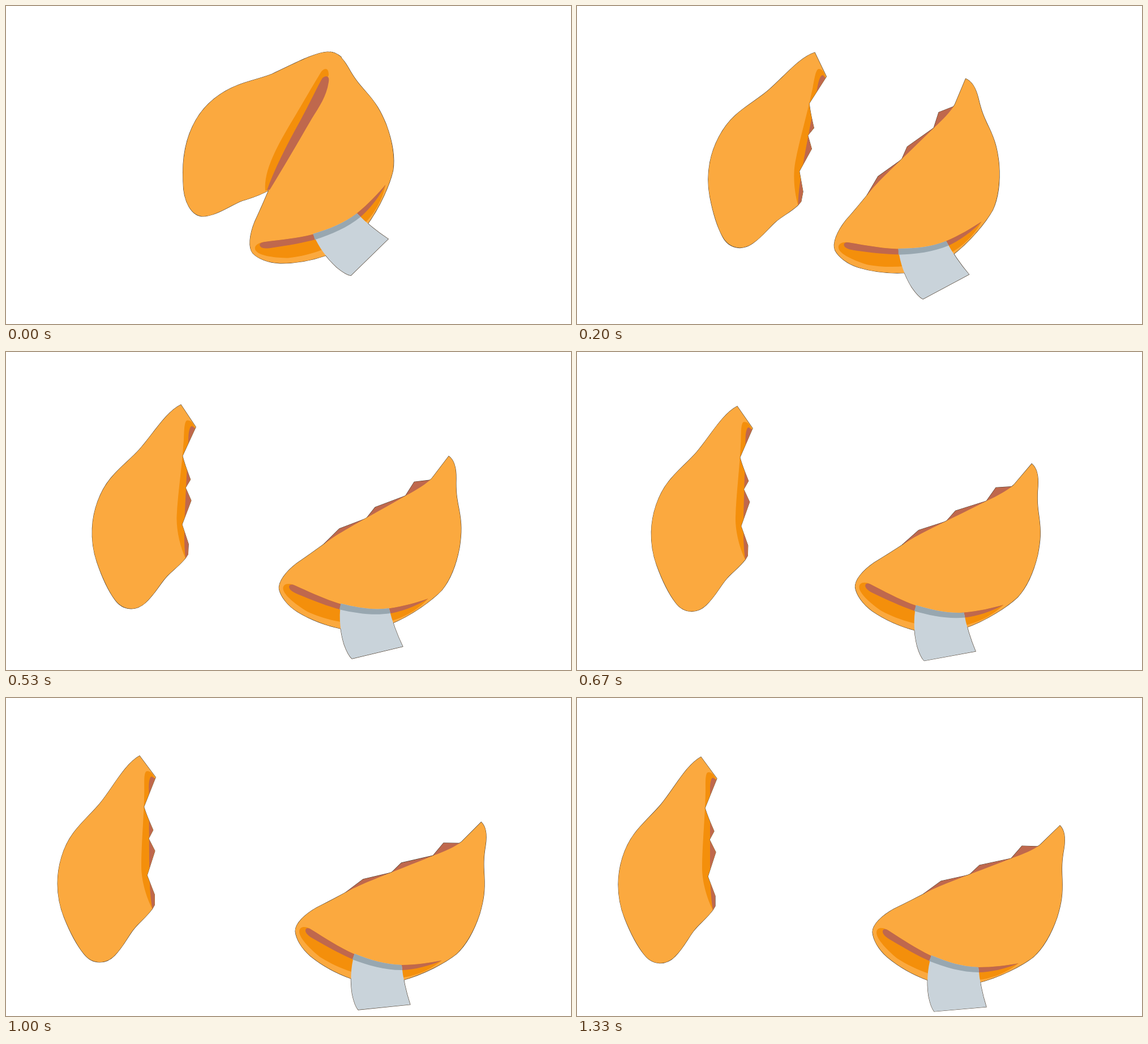
Recreate the animation shown at these times as an HTML page with a canvas. Size 998 by 561 pixels, loop 2200 ms.

```html
<!DOCTYPE html>
<html lang="en">
<head>
<meta charset="utf-8">
<title>Fortune cookie</title>
<style>
  html, body { margin: 0; width: 100%; height: 100%; overflow: hidden; background: #fff; }
  canvas { display: block; }
</style>
</head>
<body>
<canvas id="stage" width="998" height="561"></canvas>
<script>
const ctx = document.getElementById('stage').getContext('2d');
const LOOP = 2200, STEPS_PER_MS = 0.015, LAST_STEP = 20;
const DOUGH = '#fba93f', INSIDE = '#f48f0b', CRACK = '#bf684d', PAPER = '#c9d3da', SHADE = '#98a7b0';

const shape = (color, d, edged = false) => ({ color, path: new Path2D(d), edged });

// Both halves are drawn in their resting place.
const leftBody = shape(DOUGH, `M219 104L247 142L226 194Q230 208 242 235L234 250L245 272L231 315L244 349V367L240 374
  C228 390 216 398 206 411C196 424 188 441 173 456C157 472 134 472 119 453C106 437 93 411 84 388
  C75 365 73 345 73 329C73 298 83 264 101 240C115 221 134 205 149 187C172 159 193 118 219 104Z`, true);
const leftInside = [
  shape(INSIDE, 'M240 374C230 355 221 325 221 300C221 260 226 215 227 165C227 150 226 131 232 131C240 131 243 138 246 144H260V374Z'),
  shape(CRACK, 'M240 374C236 350 235 325 235 290V160C235 146 238 139 241 141L247 145H260V374Z')
];
leftInside.forEach(s => s.clip = leftBody.path);
const left = [leftBody, ...leftInside];

const chips = shape(CRACK, 'M613 345L643 323L693 312L711 295L767 283L786 261L816 262L790 290L640 345Z', true);
const right = [
  shape(DOUGH, `M853 225C862 234 863 248 860 266C856 288 856 300 857 320C858 345 856 361 848 387
    C840 410 826 439 806 457C788 471 748 493 706 503L620 498C590 487 566 472 548 457
    C532 443 523 426 522 413C522 400 538 384 560 372C583 361 608 348 625 339
    C650 327 690 313 767 283C789 275 806 268 818 259Z`, true),
  shape(INSIDE, `M780 468C755 488 725 497 700 498C650 500 600 482 565 459C548 445 529 425 529 414
    C529 404 540 404 548 409C600 442 645 474 710 475C735 475 758 472 780 468Z`),
  shape(CRACK, `M780 468C760 477 730 484 709 484C650 484 600 454 556 428C545 422 539 416 540 411
    C541 407 545 407 550 410C600 442 645 474 710 475C735 475 758 472 780 468Z`),
  shape(PAPER, 'M626 454C618 480 618 505 621 526Q625 546 631 553L723 545Q712 510 709 475C680 474 655 466 626 454Z', true),
  shape(SHADE, 'M626 454C655 466 680 474 709 475L710 484C680 484 650 475 622 464Z')
];

// Parts seen only while the cookie is whole.
const wholeBody = shape(DOUGH, `M466 324C445 336 428 340 416 344C396 352 370 371 348 371C328 371 313 345 313 310
  C311 275 316 235 335 202C352 172 380 151 410 139.5C430 131.5 450 128 470 120
  C505 104 545 82 568 81Q582 81 592 90L600 130L500 300Z`, true);
const fold = [
  shape(INSIDE, 'M458 326C455 290 478 248 510 195C528 165 545 135 555 119C560 110 570 106 570 122L540 180L466 323Z'),
  shape(CRACK, `M461 325C474 288 496 245 521 200C541 163 551 140 559 127C566 121 572 124 570 134
    C566 160 553 178 540 199C515 242 490 285 466 324Z`)
];

// Pivot position and rotation (degrees) at each key step.
const keySteps = [0, 3, 6, 8, 12, 15, 20];
const leftMove = {
  x: [564, 420, 342, 309, 262, 236, 219],
  y: [82, 82, 90, 93, 98.5, 102, 104],
  angle: [28, 10.7, 4.7, 2.75, 0.6, -0.3, 0]
};
const rightMove = {
  x: [609, 611, 609, 611, 616, 622, 631],
  y: [475.5, 517, 535, 541, 547, 550, 553],
  angle: [-39.3, -23.1, -12.5, -8.5, -3.1, -0.8, 0]
};

// Slope at key i of the parabola through it and its neighbours.
function slope(values, i) {
  const mid = Math.min(Math.max(i, 1), keySteps.length - 2);
  const h0 = keySteps[mid] - keySteps[mid - 1], h1 = keySteps[mid + 1] - keySteps[mid];
  const d0 = (values[mid] - values[mid - 1]) / h0, d1 = (values[mid + 1] - values[mid]) / h1;
  const bend = (d1 - d0) / (h0 + h1);
  return d0 + bend * h0 + 2 * bend * (keySteps[i] - keySteps[mid]);
}

function valueAt(values, step) {
  let i = 0;
  while (i < keySteps.length - 2 && step >= keySteps[i + 1]) i++;
  const h = keySteps[i + 1] - keySteps[i], u = (step - keySteps[i]) / h, v = 1 - u;
  return v * v * (1 + 2 * u) * values[i] + u * u * (1 + 2 * v) * values[i + 1]
    + h * u * v * (v * slope(values, i) - u * slope(values, i + 1));
}

function pose(move, step) {
  return new DOMMatrix()
    .translate(valueAt(move.x, step), valueAt(move.y, step))
    .rotate(valueAt(move.angle, step))
    .translate(-move.x.at(-1), -move.y.at(-1));
}

// Edges go below all fills, so only the silhouette keeps its dark line.
function paint(groups) {
  for (const [matrix, shapes] of groups) {
    ctx.setTransform(matrix);
    shapes.filter(s => s.edged).forEach(s => ctx.stroke(s.path));
  }
  for (const [matrix, shapes] of groups) {
    ctx.setTransform(matrix);
    for (const s of shapes) {
      ctx.save();
      if (s.clip) ctx.clip(s.clip);
      ctx.fillStyle = s.color;
      ctx.fill(s.path);
      ctx.restore();
    }
  }
}

function draw(now) {
  const step = Math.min(LAST_STEP, Math.floor((now % LOOP + 4) * STEPS_PER_MS));
  const still = new DOMMatrix(), rightPose = pose(rightMove, step);
  ctx.resetTransform();
  ctx.clearRect(0, 0, 998, 561);
  ctx.strokeStyle = '#4a3a2a';
  ctx.lineWidth = 1.2;
  paint(step === 0
    ? [[still, [wholeBody]], [rightPose, right], [still, fold]]
    : [[pose(leftMove, step), left], [rightPose, [chips, ...right]]]);
}

const start = performance.now();
function tick() {
  draw(performance.now() - start);
  requestAnimationFrame(tick);
}
tick();
</script>
</body>
</html>
```
